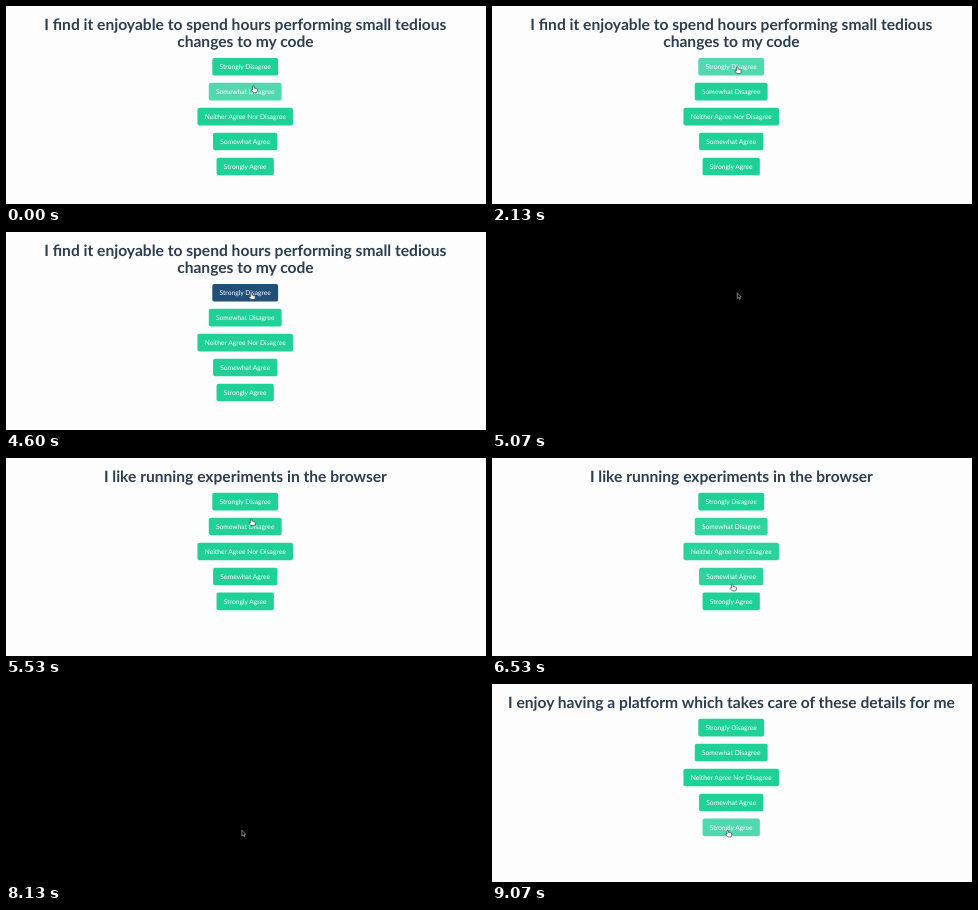
Animation, 480 px wide and 198 px high, one loop 9470 ms. Source, as an HTML page:

```html
<!DOCTYPE html>
<html lang="en">
<head>
<meta charset="utf-8">
<title>Survey</title>
<style>
  html, body { margin: 0; width: 100%; height: 100%; overflow: hidden; background: #fdfdfd; }
  svg { display: block; width: 100vw; height: 100vh; font-family: Lato, sans-serif; text-anchor: middle; text-rendering: geometricPrecision; }
  .title { font-size: 15.6px; font-weight: 700; fill: #2c3e50; }
  .label { font-size: 6.7px; fill: #fff; }
</style>
</head>
<body>
<svg id="stage" viewBox="0 0 480 198">
  <rect id="back" width="480" height="198"/>
  <g id="page">
    <text class="title" x="239.4" y="24"></text>
    <text class="title" x="239.4" y="41"></text>
    <g id="buttons"></g>
  </g>
  <path id="arrow" d="M0 0V5.6L1.3 4.5L2.3 6.6L3.2 6.2L2.4 4.2H4Z" fill="#000" stroke="#ccc" stroke-width=".6"/>
  <path id="hand" d="M-.8 .5Q0 -.4 .8 .5V2.4Q1.6 1.9 2 2.6Q2.8 2.3 3.1 3Q4 2.8 4 3.7V5Q3.8 6 3.1 6.8H-.2Q-1 5.8 -2.4 4.2Q-2.3 3.1 -.8 4Z" fill="#f4f4f4" stroke="#333" stroke-width=".65" stroke-linejoin="round"/>
</svg>
<script>
const LOOP = 9470, FRAME = 200 / 3, FADE = 300;
const GREEN = [31, 209, 151], LIT = [80, 217, 175], PRESSED = [33, 79, 119];
const MIDDLE = 239.2, TOP = 60.7, GAP = 24.95, HALF = 8.8, LINE = 17.1;
const LABELS = ["Strongly Disagree", "Somewhat Disagree", "Neither Agree Nor Disagree", "Somewhat Agree", "Strongly Agree"];

const PAGES = [
  { from: -FADE, to: 5065, press: 4180,
    lines: ["I find it enjoyable to spend hours performing small tedious", "changes to my code"] },
  { from: 5530, to: 8065, press: 7310, lines: ["I like running experiments in the browser"] },
  { from: 8595, to: LOOP, press: LOOP, lines: ["I enjoy having a platform which takes care of these details for me"] }
];

// pointer moves: start, end, x and y reached
const START = [247.4, 79.8];
const MOVES = [
  [260, 400, 246.6, 71], [1390, 1600, 245.2, 60.8], [6370, 6535, 240.4, 126.8], [6535, 6800, 235.8, 146.2]
];

const $ = id => document.getElementById(id);
const clamp = k => Math.max(0, Math.min(1, k));
const ease = k => 1 - (1 - clamp(k)) ** 2;
const mix = (a, b, k) => a.map((v, i) => v + (b[i] - v) * k);
const show = (el, on) => el.setAttribute("display", on ? "inline" : "none");

function make(tag, attrs, parent) {
  const el = document.createElementNS("http://www.w3.org/2000/svg", tag);
  for (const key in attrs) el.setAttribute(key, attrs[key]);
  return parent.appendChild(el);
}

const titles = document.querySelectorAll(".title");
const boxes = LABELS.map((label, i) => {
  const y = TOP + i * GAP;
  const box = make("rect", { y: y - HALF, height: 2 * HALF, rx: 2 }, $("buttons"));
  const text = make("text", { class: "label", x: MIDDLE, y: y + 2.5 }, $("buttons"));
  text.textContent = label;
  const width = text.getComputedTextLength() + 14.4;
  box.setAttribute("x", MIDDLE - width / 2);
  box.setAttribute("width", width);
  return box;
});

const lift = page => page.lines.length > 1 ? 0 : LINE;
const pointer = t => MOVES.reduce((p, [a, b, ...to]) => mix(p, to, clamp((t - a) / (b - a))), START);

// index of the button under the pointer, or -1
function target(page, t) {
  if (t < page.from) return -1;
  const y = pointer(t)[1] + lift(page) - TOP;
  const i = Math.round(y / GAP);
  return Math.abs(y - i * GAP) < HALF ? i : -1;
}

// eased hover: how much of the last FADE ms was spent on each button
function hover(page, t) {
  const lit = LABELS.map(() => 0), n = 60;
  for (let k = 0; k < n; k++) {
    const i = target(page, t - k / n * FADE);
    if (i >= 0) lit[i] += ease((k + 1) / n) - ease(k / n);
  }
  return lit;
}

function drawPage(page, t) {
  const lit = hover(page, t), pressed = target(page, page.press);
  titles.forEach((el, i) => el.textContent = page.lines[i] || "");
  $("buttons").setAttribute("transform", `translate(0 ${-lift(page)})`);
  boxes.forEach((box, i) => {
    const down = i === pressed ? ease((t - page.press) / FADE) : 0;
    const colour = mix(mix(GREEN, LIT, lit[i]), PRESSED, down);
    box.setAttribute("fill", `rgb(${colour.map(Math.round)})`);
  });
}

function draw(t) {
  const page = PAGES.find(p => t >= p.from && t < p.to);
  const onButton = page && target(page, t) >= 0;
  show($("page"), page);
  $("back").setAttribute("fill", page ? "#fdfdfd" : "#000");
  if (page) drawPage(page, t);
  for (const id of ["arrow", "hand"]) {
    show($(id), (id === "hand") === !!onButton);
    $(id).setAttribute("transform", `translate(${pointer(t)})`);
  }
}

function tick() {
  const t = performance.now() % LOOP;
  draw(Math.floor((t + 4) / FRAME) * FRAME % LOOP);
  requestAnimationFrame(tick);
}
tick();
</script>
</body>
</html>
```
